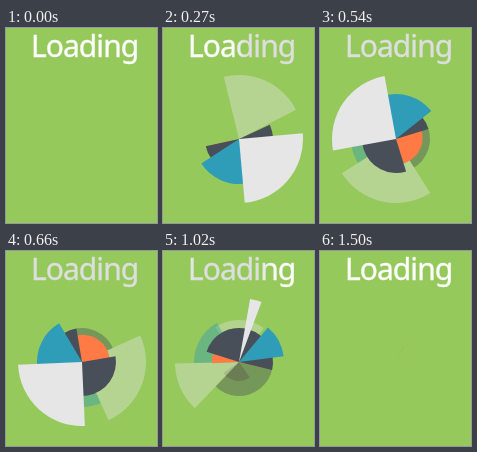
Write an HTML page that moves like this. It is 151 px wide and 195 px high and loops after 1530 ms.

```html
<!DOCTYPE html>
<html lang="en">
<head>
<meta charset="utf-8">
<title>Loading</title>
<style>
  html, body { margin: 0; width: 100%; height: 100%; overflow: hidden; background: #95c95b; }
  svg { display: block; width: 100vw; height: 100vh; }
  text { font: 30px "Noto Sans", "Open Sans", sans-serif; letter-spacing: -0.95px; }
</style>
</head>
<body>
<svg viewBox="0 0 151 195">
  <defs>
    <linearGradient id="shine" gradientUnits="userSpaceOnUse" x1="0" x2="151" y1="0" y2="0">
      <stop stop-color="#fff"/>
      <stop stop-color="#dedede"/>
      <stop stop-color="#dedede"/>
      <stop stop-color="#fff"/>
    </linearGradient>
  </defs>
  <rect width="151" height="195" fill="#95c95b"/>
  <text x="25" y="29" fill="url(#shine)" stroke="url(#shine)" stroke-width=".35">Loading</text>
  <g id="echo"></g>
  <g id="ghost" opacity=".4"></g>
  <g id="pie"></g>
  <path id="spark" fill="#ff7a45"/>
</svg>
<script>
const LOOP = 1530, STEP = 30, TURN = 525, STOP = 1080;
const CX = 76, CY = 111;
const $ = id => document.getElementById(id);
const clamp = (v, a = 0, b = 1) => Math.min(b, Math.max(a, v));
const ramp = (t, [a, b]) => clamp((t - a) / (b - a));

// Back to front; "end" is the trailing edge, relative to the white slice.
// Each in/out pair gives the times over which a slice opens and closes.
const slices = [
  { color: '#ff7a45', r: 27, span: 359.9, end: 83,
    pie: { in: [120, 420], out: [970, 1080] }, ghost: { in: [240, 450], out: [900, 1060] } },
  { color: '#484f59', r: 34, span: 270, end: 83,
    pie: { in: [60, 354], out: [988, 1080] }, ghost: { in: [220, 420], out: [998, 1330] } },
  { color: '#2f9cb8', r: 45, span: 135, end: 62,
    pie: { in: [30, 270], out: [890, 1080] }, ghost: { in: [220, 420], out: [770, 1270] } },
  { color: '#e6e6e6', r: 64, span: 90, end: 0,
    pie: { in: [0, 240], out: [900, 1036] }, ghost: { in: [30, 312], out: [883, 1156] } }
];

function addPath(group, color, opacity = 1) {
  const p = document.createElementNS('http://www.w3.org/2000/svg', 'path');
  p.setAttribute('fill', color);
  p.setAttribute('opacity', opacity);
  return group.appendChild(p);
}

const layers = ['pie', 'ghost'].map(id => ({
  id, turn: id === 'pie' ? 0 : -112,
  paths: slices.map(s => addPath($(id), s.color))
}));
const pale = addPath($('echo'), '#e6e6e6', .35);
const brown = addPath($('echo'), '#6b5a3c', .4);
const stops = document.querySelectorAll('stop');

// Angles run clockwise from the top.
function sector(r, start, end) {
  if (r < .3 || end - start < .2) return '';
  const at = deg => {
    const a = deg * Math.PI / 180;
    return (CX + r * Math.sin(a)).toFixed(2) + ' ' + (CY - r * Math.cos(a)).toFixed(2);
  };
  return `M${CX} ${CY}L${at(start)}A${r} ${r} 0 ${end - start > 180 ? 1 : 0} 1 ${at(end)}Z`;
}

// A grey band sweeps in from the right, then closes around the "a".
function drawText(t) {
  const close = ramp(t, [840, 1440]);
  const left = Math.max(160 - .3 * t, 14) + 48 * close;
  const right = 151 - 89 * Math.sqrt(close);
  const lit = t >= 90 && close < 1;
  const edges = [left - 12, left + 4, right - 8, right + 12];
  edges.forEach((x, i) => stops[i].setAttribute('offset', lit ? clamp(x / 151) : 1));
}

function drawSpark(t) {
  const k = ramp(t, [STOP, LOOP]);
  const end = 97 - 75 * k;
  $('spark').setAttribute('d', k ? sector(38 - 22 * k, end - 17 + 16 * k, end) : '');
  $('spark').setAttribute('opacity', .62 - .31 * k);
}

function draw(t) {
  const held = Math.min(t, STOP);
  const spin = -360 * held / TURN;
  const scale = 1 - Math.pow(ramp(t, [STOP, 1490]), 1.33);

  for (const { id, turn, paths } of layers) {
    slices.forEach((s, i) => {
      const life = s[id];
      const open = ramp(held, life.in) * (1 - ramp(held, life.out));
      const end = spin + turn + s.end;
      paths[i].setAttribute('d', sector(s.r * scale, end - s.span * open, end));
    });
  }

  const echo = t < STOP ? ramp(t, [930, 1020]) : 0;
  const drift = spin + 360 * 1020 / TURN;
  pale.setAttribute('d', sector(42, 36 - 70 * echo + drift, 36 + drift));
  brown.setAttribute('d', sector(19 * echo, 145 + drift, 235 + drift));

  drawSpark(t);
  drawText(t);
}

function tick(now) {
  draw(Math.floor((now % LOOP) / STEP) * STEP);
  requestAnimationFrame(tick);
}
draw(0);
requestAnimationFrame(tick);
</script>
</body>
</html>
```
